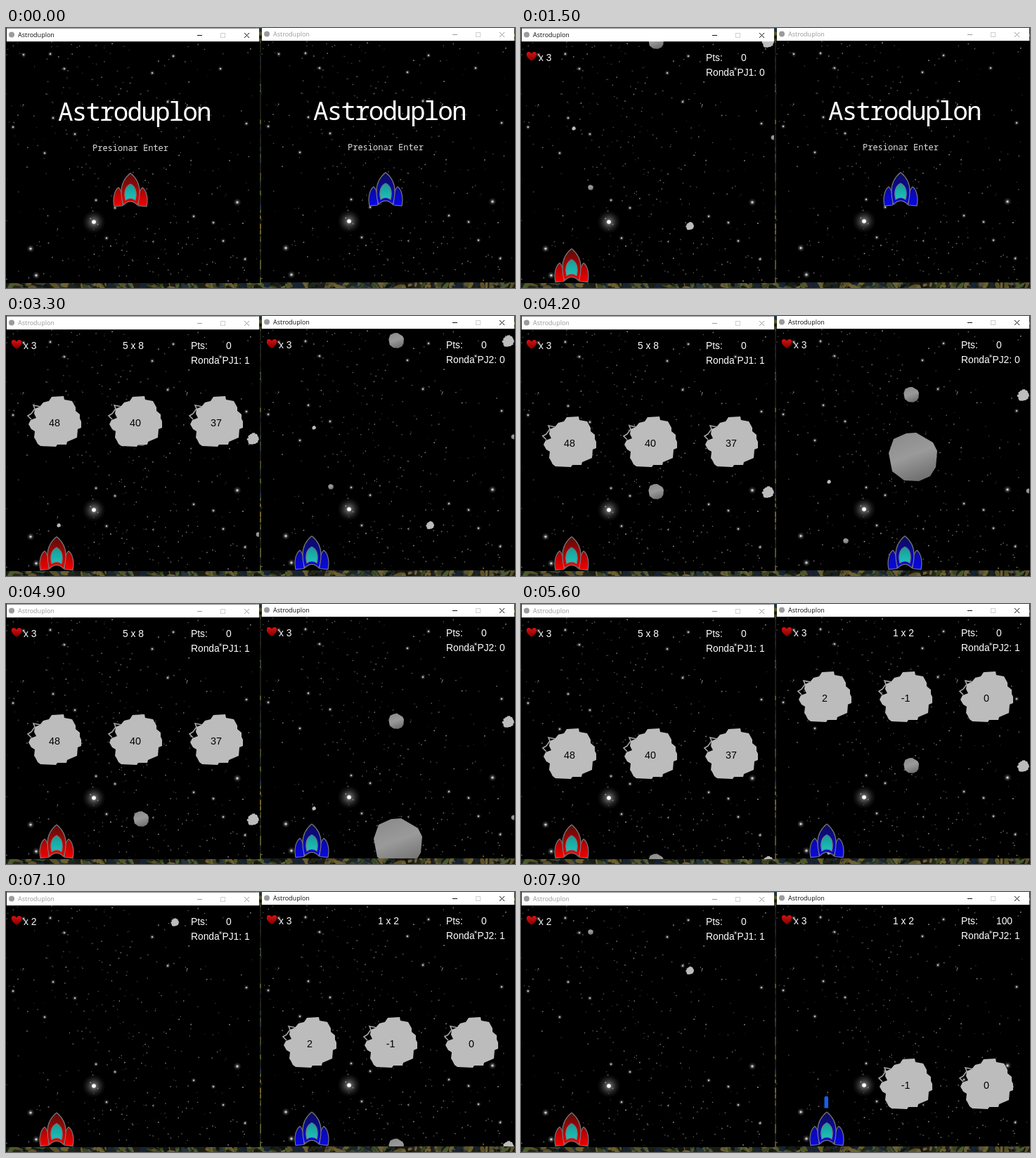
An HTML page with a canvas that plays this animation: 724x370 px, repeating every 8 s.

```html
<!DOCTYPE html>
<html lang="es">
<head>
<meta charset="utf-8">
<title>Astroduplon</title>
<style>
html, body { margin: 0; width: 100%; height: 100%; overflow: hidden; background: #15160f; }
canvas { display: block; }
</style>
</head>
<body>
<canvas id="stage" width="724" height="370"></canvas>
<script>
const W = 724, H = 370, LOOP = 8000, STEP = 100;
const NAME = 'Astroduplon';
const SANS = '"Liberation Sans", Arial, sans-serif';
const MONO = '"Noto Sans Mono", monospace';
const stage = document.getElementById('stage').getContext('2d');

function seeded(s) {
  return () => {
    s = (s * 1664525 + 1013904223) >>> 0;
    return s / 4294967296;
  };
}

// Value at time t along [time, value] pairs, linear between them.
function along(keys, t) {
  if (t <= keys[0][0]) return keys[0][1];
  for (let i = 1; i < keys.length; i++) {
    const [t0, a] = keys[i - 1], [t1, b] = keys[i];
    if (t <= t1) return a + (b - a) * (t - t0) / (t1 - t0);
  }
  return keys[keys.length - 1][1];
}

// Last value whose start time has passed.
function held(keys, t) {
  let value = keys[0][1];
  for (const [start, v] of keys) if (t >= start) value = v;
  return value;
}

function layer(paint) {
  const c = document.createElement('canvas');
  c.width = W;
  c.height = H;
  paint(c.getContext('2d'));
  return c;
}

function disc(g, x, y, r, fill) {
  g.fillStyle = fill;
  g.beginPath();
  g.arc(x, y, r, 0, 7);
  g.fill();
}

function glow(g, x, y, r, strength) {
  const light = g.createRadialGradient(x, y, 0, x, y, r);
  light.addColorStop(0, `rgba(255,255,255,${strength})`);
  light.addColorStop(0.25, `rgba(190,190,190,${strength * 0.55})`);
  light.addColorStop(1, 'rgba(60,60,60,0)');
  disc(g, x, y, r, light);
}

const sky = layer(g => {
  const rnd = seeded(41);
  g.fillStyle = '#000';
  g.fillRect(0, 19, 361, 344);
  for (let i = 0; i < 430; i++) {
    const y = 20 + rnd() * 342;
    const band = 90 + (y - 20) * 0.45 + (rnd() + rnd() - 1) * 190;
    const x = i % 3 ? band : rnd() * 360;
    const v = 45 + Math.floor(rnd() * 95);
    disc(g, x, y, 0.45 + rnd() * 0.6, `rgb(${v},${v},${v})`);
  }
  const bright = [[35, 314], [43, 352], [128, 245], [55, 178], [329, 248], [305, 58], [342, 136],
    [238, 40], [230, 105], [10, 141], [295, 277], [267, 268], [143, 299], [340, 329], [98, 151],
    [63, 37], [25, 38], [83, 58], [67, 128], [309, 303], [208, 64], [155, 256]];
  bright.forEach(([x, y], i) => {
    const big = i < 2 || i === 4;
    glow(g, x, y, big ? 6 : 4, 0.85);
    disc(g, x, y, big ? 1.6 : 1, '#ccc');
  });
  glow(g, 125, 276, 17, 0.8);
  disc(g, 125, 276, 2.8, '#fff');
});

const desktop = layer(g => {
  const rnd = seeded(9);
  const tones = ['#22261a', '#3c4420', '#5b5128', '#182433', '#4a5a2c', '#101410', '#6d6030', '#26343a'];
  g.fillStyle = '#1a1d16';
  g.fillRect(0, 0, W, H);
  function blob(x, y, w, h) {
    g.fillStyle = tones[Math.floor(rnd() * tones.length)];
    g.beginPath();
    g.ellipse(x, y, w, h, rnd() * 3, 0, 7);
    g.fill();
  }
  for (let i = 0; i < 260; i++) blob(rnd() * W, 362 + rnd() * 8, 2 + rnd() * 8, 1 + rnd() * 3);
  for (let i = 0; i < 90; i++) blob(i % 2 ? 362 : 723, rnd() * 360, 3, 2 + rnd() * 6);
});

function poly(g, flat) {
  g.beginPath();
  for (let i = 0; i < flat.length; i += 2) g.lineTo(flat[i], flat[i + 1]);
  g.closePath();
}

function at(g, x, y, paint, scale = 1) {
  g.save();
  g.translate(x, y);
  g.scale(scale, scale);
  paint();
  g.restore();
}

const BOULDER = [-34, -6, -27, -26, -9, -34, 5, -35, 29, -21, 35, -9, 33, 14, 25, 27, 9, 34, -12, 33, -29, 20];
const CRAG = [-4, -37, 13, -38, 14, -33, 25, -31, 30, -22, 30, -17, 36, -12, 36, -6, 38, -2, 38, 7, 33, 9,
  32, 21, 18, 27, 17, 31, 4, 31, 2, 34, -20, 33, -24, 30, -27, 24, -29, 21, -28, 12, -33, 9, -37, 2, -34, -4,
  -26, -7, -29, -13, -28, -20, -21, -23, -16, -29, -8, -31];

function boulder(g, x, y, r) {
  at(g, x, y, () => {
    const shade = g.createLinearGradient(-12, -35, 14, 35);
    shade.addColorStop(0, '#8c8c8c');
    shade.addColorStop(0.45, '#9a9a9a');
    shade.addColorStop(1, '#6c6c6c');
    g.fillStyle = shade;
    poly(g, BOULDER);
    g.fill();
  }, r / 35);
}

function crag(g, x, y, r) {
  at(g, x, y, () => {
    g.fillStyle = '#bcbcbc';
    poly(g, CRAG);
    g.fill();
  }, r / 37);
}

function text(g, s, x, y, font, color = '#fff', align = 'left') {
  g.font = font;
  g.fillStyle = color;
  g.textAlign = align;
  g.fillText(s, x, y);
}

function answer(g, label, x, y) {
  crag(g, x, y, 37);
  at(g, x, y, () => {
    g.strokeStyle = '#a8a8a8';
    g.lineWidth = 1.6;
    g.beginPath();
    g.moveTo(-20, -23);
    g.lineTo(-30, -25);
    g.lineTo(-28, -20);
    g.lineTo(-33, -13);
    g.lineTo(-38, -10);
    g.lineTo(-33, -5);
    g.stroke();
  });
  text(g, label, x, y + 5, '14.3px ' + SANS, '#000', 'center');
}

function ship(g, x, y, [dark, light]) {
  at(g, x, y, () => {
    const paint = g.createLinearGradient(0, 2, 0, 46);
    paint.addColorStop(0, dark);
    paint.addColorStop(1, light);
    g.strokeStyle = '#777';
    g.lineWidth = 1.2;
    g.fillStyle = paint;
    for (const side of [-1, 1]) {
      g.beginPath();
      g.moveTo(side * 11, 47);
      g.lineTo(side * 23, 48);
      g.bezierCurveTo(side * 25.5, 37, side * 23, 25, side * 17, 21);
      g.bezierCurveTo(side * 13, 24, side * 11, 34, side * 11, 47);
      g.fill();
      g.stroke();
    }
    g.beginPath();
    g.moveTo(0, 0.5);
    g.bezierCurveTo(8, 7, 13, 17, 13, 27);
    g.quadraticCurveTo(13, 38, 10, 46);
    g.quadraticCurveTo(0, 36, -10, 46);
    g.quadraticCurveTo(-13, 38, -13, 27);
    g.bezierCurveTo(-13, 17, -8, 7, 0, 0.5);
    g.fill();
    g.stroke();
    const glass = g.createLinearGradient(0, 16, 0, 41);
    glass.addColorStop(0, '#159a96');
    glass.addColorStop(1, '#20c5bd');
    g.fillStyle = glass;
    g.beginPath();
    g.moveTo(0, 16);
    g.bezierCurveTo(7, 19, 10, 28, 7, 39);
    g.quadraticCurveTo(0, 34, -7, 39);
    g.bezierCurveTo(-10, 28, -7, 19, 0, 16);
    g.fill();
    g.stroke();
  });
}

function heart(g) {
  at(g, 15, 34, () => {
    const red = g.createLinearGradient(0, 0, 0, 13);
    red.addColorStop(0, '#e01010');
    red.addColorStop(1, '#7c0000');
    g.fillStyle = red;
    g.beginPath();
    g.moveTo(0, 2.5);
    g.bezierCurveTo(3, -2, 8, 0, 7, 5);
    g.quadraticCurveTo(6, 9, 0, 13);
    g.quadraticCurveTo(-6, 9, -7, 5);
    g.bezierCurveTo(-8, 0, -3, -2, 0, 2.5);
    g.fill();
  });
}

function titleBar(g, active) {
  const ink = active ? '#111' : '#9a9a9a';
  g.fillStyle = '#fff';
  g.fillRect(1, 0.5, 359, 18.7);
  disc(g, 8, 9.5, 4, '#9b9b9b');
  text(g, NAME, 17, 13.2, '9px "Open Sans", sans-serif', ink);
  g.lineWidth = 1;
  g.strokeStyle = ink;
  g.beginPath();
  g.moveTo(272, 10.5);
  g.lineTo(279, 10.5);
  g.moveTo(339, 7);
  g.lineTo(346, 14);
  g.moveTo(346, 7);
  g.lineTo(339, 14);
  g.stroke();
  g.strokeStyle = '#cfcfcf';
  g.strokeRect(305.5, 7.5, 6, 6);
}

function menu(g, colors) {
  g.letterSpacing = '-1.9px';
  text(g, NAME, 74, 132, '36px ' + MONO);
  g.letterSpacing = '0px';
  text(g, 'Presionar Enter', 123, 175, '12px ' + MONO, '#ddd');
  ship(g, 177, 206, colors);
}

function rocks(g, fall) {
  crag(g, 75, 143 + fall, 2.8);
  boulder(g, 99, 227 + fall, 3.8);
  crag(g, 240, 282 + fall, 5.8);
  boulder(g, 359, 156 + fall, 3.5);
  boulder(g, 192, 19 + fall, 11);
  crag(g, 351, 20 + fall, 8.5);
}

function hud(g, s) {
  const font = '13.8px ' + SANS;
  heart(g);
  text(g, 'x ' + s.lives, 25, 47, font);
  if (s.sum) text(g, s.sum, 166, 47, font);
  text(g, 'Pts:', 263, 47, font);
  text(g, s.points, 313, 47, font);
  text(g, `Ronda PJ${s.player}: ${s.round}`, 263, 68, font);
}

function game(g, s) {
  rocks(g, s.fall);
  boulder(g, 194, s.bigY, 35);
  s.answers.forEach((label, i) => {
    if (label !== null) answer(g, label, 69 + 115 * i, s.answerY);
  });
  if (s.shotY !== null) {
    g.fillStyle = '#1560e8';
    g.beginPath();
    g.roundRect(68.5, s.shotY - 8.5, 5.5, 17, [3, 3, 0, 0]);
    g.fill();
  }
  ship(g, s.shipX, 313.5, s.colors);
  hud(g, s);
}

const RED = ['#5a0c0c', '#f00000'], BLUE = ['#0c0c55', '#0808e6'];
const HIT = 6700, SCORE = 7300, FOCUS = 2500;

function first(t) {
  const playing = t >= 3100 && t < HIT;
  return {
    player: 1, colors: RED, started: t >= 600, active: t < FOCUS,
    lives: t < HIT ? 3 : 2, points: 0, round: t < 3100 ? 0 : 1, sum: playing ? '5 x 8' : '',
    fall: t < HIT
      ? along([[0, -129], [1500, 0], [3300, 155], [4200, 231], [4900, 287], [6300, 408]], t)
      : along([[HIT, -273], [7900, -170]], t),
    bigY: along([[1550, -16], [3100, 400]], t),
    answers: playing ? ['48', '40', '37'] : [],
    answerY: along([[3100, 146], [3300, 152], [4200, 181], [4900, 195], [6300, 235], [HIT, 262]], t),
    shotY: null, shipX: 72
  };
}

function second(t) {
  const playing = t >= 5200;
  return {
    player: 2, colors: BLUE, started: t >= 2800, active: t >= FOCUS,
    lives: 3, points: t < SCORE ? 0 : 100, round: playing ? 1 : 0, sum: playing ? '1 x 2' : '',
    fall: along([[2800, -26], [3300, 17], [4200, 94], [4900, 149], [6300, 275], [7900, 413]], t),
    bigY: along([[3300, -16], [4200, 202], [4900, 341], [5200, 401]], t),
    answers: playing ? [t < SCORE ? '2' : null, '-1', '0'] : [],
    answerY: along([[5200, 122], [6300, 158], [7900, 276]], t),
    shotY: held([[0, null], [7200, 300], [SCORE, null], [7900, 300]], t),
    shipX: held([[0, 72], [3700, 183], [4500, 72], [5700, 183], [6900, 72]], t)
  };
}

function windowAt(g, x, y, s) {
  at(g, x, y, () => {
    g.drawImage(sky, 0, 0);
    g.save();
    g.beginPath();
    g.rect(0, 19, 360, 344);
    g.clip();
    if (s.started) game(g, s);
    else menu(g, s.colors);
    g.restore();
    titleBar(g, s.active);
  });
}

function draw(t) {
  stage.drawImage(desktop, 0, 0);
  windowAt(stage, 0, 0, first(t));
  windowAt(stage, 363, -1, second(t));
}

const began = performance.now();
function tick() {
  const t = (performance.now() - began) % LOOP;
  draw(Math.floor(t / STEP) * STEP);
  requestAnimationFrame(tick);
}
tick();
</script>
</body>
</html>
```
